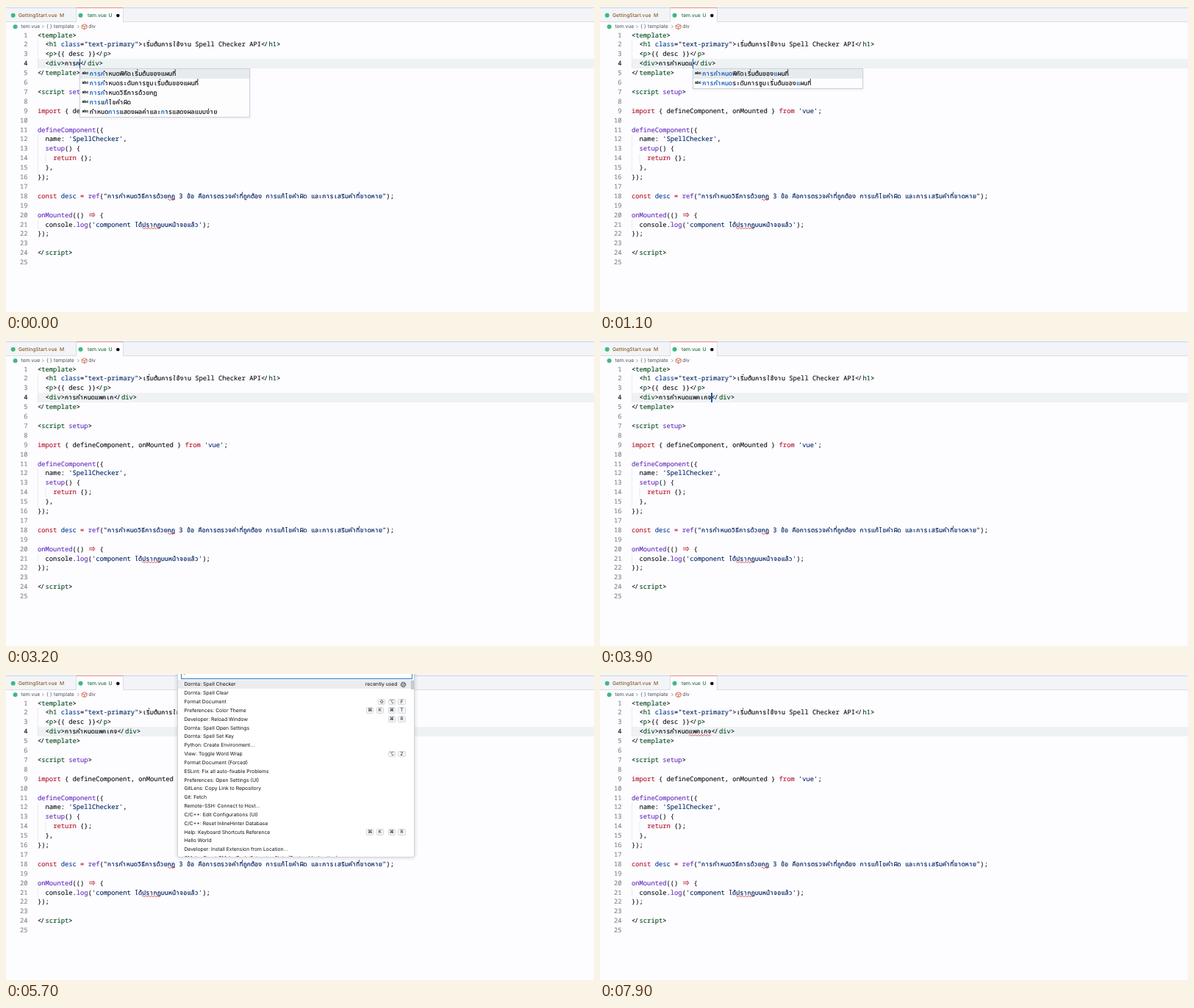
Recreate the animation shown at these times as an HTML page. Size 800 px wide and 417 px high, loop 8000 ms.

```html
<!DOCTYPE html>
<html lang="th">
<head>
<meta charset="utf-8">
<title>Editor with spell checking</title>
<style>
  html, body { margin: 0; width: 100%; height: 100%; overflow: hidden; }
  body { position: relative; background: #fdfcff; color: #0e1116; text-rendering: geometricPrecision;
    font: 6.8px/12px Inter, "Open Sans", sans-serif; }
  div, svg.over { position: absolute; white-space: pre; box-sizing: border-box; }
  svg.over { left: 0; top: 0; width: 800px; height: 417px; pointer-events: none; }
  .code { font: 8.8px/12.9px "Noto Sans Mono", "DejaVu Sans Mono", monospace; height: 12.9px;
    -webkit-text-stroke: .12px; }
  .num { left: 0; width: 29.5px; text-align: right; color: #7d858e; }
  .num.now { color: #0e1116; }
  .th { display: inline-block; width: 5.12px; line-height: 0; text-align: center; -webkit-text-stroke: .2px;
    font-family: "Noto Sans Thai Looped", Loma, "Noto Sans Thai", "Noto Sans", sans-serif; font-size: 8.4px; }
  .tight { position: relative; left: -1.2px; font-style: normal; }
  .k { color: #b3152a; } .f { color: #622cbc; } .s { color: #032563; }
  .g { color: #024c1a; } .b { color: #023b95; }
  .arrow { position: relative; }
  .arrow svg { position: absolute; left: 1px; top: 2.3px; width: 9px; height: 7px; }
  .hit { color: #0757ba; }
  #bar { left: 0; top: 0; width: 800px; height: 21.5px; background: #f3f4f8; border-bottom: .7px solid #d8dee4; }
  #edge { left: 0; top: 2px; width: 800px; height: .8px; background: #cfd5da; }
  #tab { left: 94.5px; top: 2px; width: 65.5px; height: 20px; background: #fdfcff;
    border: solid #d8dee4; border-width: 0 .7px; border-top: 1px solid #f08a80; }
  #row { left: 43px; top: 72.2px; width: 757px; height: 12.9px; background: #eff2f4; }
  #caret { top: 72.4px; width: 1.3px; height: 12.6px; background: #0759b5; }
  #pop { top: 85.3px; width: 232px; background: #fdfdfe; border: .7px solid #cdd2d8;
    box-shadow: 0 1px 3px rgba(60, 70, 80, .1); overflow: hidden; }
  #pop .code { left: 0; width: 232px; height: 13px; line-height: 13px; padding-left: 12.3px; }
  #pop .code:first-child { background: #e8ebee; }
  #pop .abc { position: absolute; left: 2px; font: 600 5.2px/12.5px Inter, sans-serif; letter-spacing: -.2px; }
  #list { left: 233px; top: -16.4px; width: 323px; height: 266.5px; background: #fff; border-radius: 0 0 3px 3px;
    border: .6px solid #d0d5da; box-shadow: 0 0 5px rgba(40, 50, 60, .24); overflow: hidden; }
  #list .ask { left: 3.5px; top: 4px; width: 315.5px; height: 18.3px; border: .9px solid #2a7fc4; }
  #list .cmd { left: 0; width: 322px; height: 11.83px; line-height: 11.83px; padding-left: 8.4px; }
  #list .cmd.on { background: #ebecee; }
  #list .bar { left: 316.5px; top: 24px; width: 4.5px; height: 12px; background: #c5c9cd; }
  .key { top: 1.6px; width: 10.4px; height: 8.8px; border: .6px solid #d5d8dc; border-radius: 1.5px;
    background: #f4f5f6; text-align: center; font: 6.2px/7.6px Inter, "DejaVu Sans", sans-serif; }
</style>
</head>
<body>
<div id="bar"></div><div id="edge"></div><div id="tab"></div><div id="row"></div>
<div id="page"></div>
<svg class="over" fill="none">
  <g id="guides" stroke="#e1e4e8" stroke-width=".7"></g>
  <g fill="#41b883"><circle cx="9.7" cy="12.8" r="3"/><circle cx="101.5" cy="12.8" r="3"/><circle cx="12.6" cy="28.2" r="3"/></g>
  <circle cx="152.3" cy="13" r="2.3" fill="#0e1116"/>
  <g stroke="#6e7781" stroke-width=".7"><path d="M49.3 26.3l1.9 1.9-1.9 1.9M97.3 26.3l1.9 1.9-1.9 1.9"/></g>
  <path stroke="#c4512d" stroke-width=".8" d="M103.2 26.6l3.6-1.8 3.3 1.6v3.4l-3.5 1.9-3.4-1.7zl3.4 1.6 3.5-1.8m-3.5 1.8v3.5"/>
  <g id="waves" stroke="#d1242f" stroke-width=".8"></g>
  <path id="newWave" stroke="#d1242f" stroke-width=".8"/>
</svg>
<div id="caret"></div>
<div id="pop"></div>
<div id="list"></div>
<script>
const LOOP = 8000, CELL = 5.28, THAI = 5.12, LEFT = 43, STEP = 12.9;
const $ = id => document.getElementById(id);
const esc = s => s.replace(/&/g, '&amp;').replace(/</g, '&lt;');
const lineTop = n => 33.5 + (n - 1) * STEP;

// One Thai cell: a base letter with the marks above and below it
const CELLS = /[\u0e00-\u0e7f][\u0e31\u0e34-\u0e3a\u0e47-\u0e4e]*/g;

const grid = s => esc(s)
  .replace(CELLS, c => `<span class="th">${c}</span>`)
  .replace(/&lt;\//g, '&lt;<i class="tight">/</i>');

const arrow = '<span class="arrow k">  <svg viewBox="0 0 9 7" fill="none" stroke="currentColor" ' +
  'stroke-width=".8"><path d="M0 2.4h7M0 4.8h7M5 .6l3.2 3L5 6.6"/></svg></span>';

// Pieces are split by "|"; a leading "x:" names the colour class
const paint = line => line.split('|').map(p => {
  const m = p.match(/^([a-z]):(.*)$/);
  if (p === '=>') return arrow;
  return m ? `<span class="${m[1]}">${grid(m[2])}</span>` : grid(p);
}).join('');

const lines = [
  '<|g:template|>',
  '  <|g:h1| |b:class|=|s:"text-primary"|>เริ่มต้นการใช้งาน Spell Checker API</|g:h1|>',
  '  <|g:p|>{{ desc }}</|g:p|>',
  '',
  '</|g:template|>',
  '',
  '<|g:script| |f:setup|>',
  '',
  'k:import| { defineComponent, onMounted } |k:from| |s:\'vue\'|;',
  '',
  'f:defineComponent|({',
  '  name: |s:\'SpellChecker\'|,',
  '  |f:setup|() {',
  '    |k:return| {};',
  '  },',
  '});',
  '',
  'k:const| |b:desc| |k:=| |f:ref|(|s:"การกำหนดวิธีการด้วยกฏ 3 ข้อ คือการตรวจคำที่ถูกต้อง การแก้ไขคำผิด และการเสริมคำที่ขาดหาย"|);',
  '',
  'f:onMounted|(() |=>| {',
  '  console.|f:log|(|s:\'component ได้ปรากฏบนหน้าจอแล้ว\'|);',
  '});',
  '',
  '</|g:script|>',
  ''
];

$('page').innerHTML = lines.map((text, i) => {
  const n = i + 1, top = `top:${lineTop(n)}px`;
  return `<div class="code num${n === 4 ? ' now' : ''}" style="${top}">${n}</div>` +
    `<div class="code" id="line${n}" style="${top};left:${LEFT}px">${paint(text)}</div>`;
}).join('');

const label = (x, y, text, color) =>
  `<div style="left:${x}px;top:${y - 6}px;color:${color}">${text}</div>`;
$('page').innerHTML += [
  [17, 13, 'GettingStart.vue', '#744500'], [73, 13, 'M', '#744500'],
  [111, 13, 'tem.vue', '#055d20'], [139.5, 13, 'U', '#055d20'],
  [20.5, 28.2, 'tem.vue', '#4b535d'], [55, 28.2, '{ }', '#4b535d'],
  [65, 28.2, 'template', '#4b535d'], [112.3, 28.2, 'div', '#4b535d']
].map(a => label(...a)).join('');

// Indent guides: column, first line, last line
$('guides').innerHTML = [[0, 2, 4], [0, 12, 15], [2, 14, 14], [0, 21, 21]].map(([c, a, b]) =>
  `<path d="M${LEFT + .4 + c * CELL} ${lineTop(a)}V${lineTop(b + 1)}"/>`).join('');

const wave = (x, n, w) => {
  let d = `M${x} ${lineTop(n) + 11.3}q1 -2 2 0`;
  for (let i = 2; i < w - 1; i += 2) d += 't2 0';
  return d;
};
$('waves').innerHTML = [[220, 18, 10.2], [185, 21, 24]]
  .map(a => `<path d="${wave(...a)}"/>`).join('');

// Command list
const commands = [
  'Dornta: Spell Checker', 'Dornta: Spell Clear', 'Format Document|⇧⌥F',
  'Preferences: Color Theme|⌘K ⌘T', 'Developer: Reload Window|⌘R',
  'Dornta: Spell Open Settings', 'Dornta: Spell Set Key', 'Python: Create Environment...',
  'View: Toggle Word Wrap|⌥Z', 'Format Document (Forced)', 'ESLint: Fix all auto-fixable Problems',
  'Preferences: Open Settings (UI)', 'GitLens: Copy Link to Repository', 'Git: Fetch',
  'Remote-SSH: Connect to Host...', 'C/C++: Edit Configurations (UI)',
  'C/C++: Reset InlineHinter Database', 'Help: Keyboard Shortcuts Reference|⌘K ⌘R',
  'Hello World', 'Developer: Install Extension from Location...',
  'CMake: Reset CMake Tools Extension State (For troubleshooting)'
];

const keys = (text = '') => {
  let x = 299.3, out = '';
  for (const c of [...text].reverse()) {
    if (c === ' ') { x -= 2.4; continue; }
    out += `<div class="key" style="left:${x}px">${c}</div>`;
    x -= 13.6;
  }
  return out;
};

const gear = '<svg style="position:absolute;left:302px;top:1.8px" width="9" height="9" viewBox="-4.5 -4.5 9 9" ' +
  'fill="none" stroke="#3b4249"><circle r="2.7" stroke-width=".9"/><circle r="1" stroke-width=".7"/>' +
  '<circle r="3.5" stroke-width=".9" stroke-dasharray="1.4 1.35"/></svg>';

$('list').innerHTML = '<div class="ask"></div><div style="left:7.5px;top:8.6px">&gt;</div>' +
  '<div id="askCaret" style="left:12.6px;top:11px;width:.8px;height:8.3px;background:#0e1116"></div>' +
  commands.map((c, i) => {
    const [name, combo] = c.split('|');
    const extra = i ? '' : `<div style="right:23.5px;top:0">recently used</div>${gear}`;
    return `<div class="cmd${i ? '' : ' on'}" style="top:${23.8 + i * 11.83}px">${name}${keys(combo)}${extra}</div>`;
  }).join('') + '<div class="bar"></div>';

// Suggestions
const phrases = [
  'การกำหนดพิกัดเริ่มต้นของแผนที่', 'การกำหนดระดับการซูมเริ่มต้นของแผนที่',
  'การกำหนดวิธีการด้วยกฏ', 'การแก้ไขคำผิด', 'กำหนดการแสดงผลค่าและการแสดงผลแบบง่าย'
];

const match = (phrase, typed) => {
  const hits = new Set();
  let at = phrase.indexOf(typed.slice(0, 3));
  if (at < 0) return null;
  for (const c of typed) {
    at = phrase.indexOf(c, at);
    if (at < 0) return null;
    hits.add(at++);
  }
  return hits;
};

const suggest = typed => phrases.map(p => {
  const hits = match(p, typed);
  return hits && '<div class="code"><span class="abc">abc</span>' + p.replace(CELLS, (c, at) =>
    `<span class="th${hits.has(at) ? ' hit' : ''}">${c}</span>`) + '</div>';
}).filter(Boolean);

// Timeline
const WORD = 'การกำหนดแพคเกจ', FIRST = 4;
const presses = [200, 400, 600, 800, 1000, 1700, 2000, 2300, 2600, 3600];
const OPEN = 4100, CLOSE = 6950, CHECKED = 7600;
const events = [0, ...presses, OPEN, CLOSE];
const show = (id, on) => { $(id).style.display = on ? '' : 'none'; };
const wordX = LEFT + 7 * CELL;
$('newWave').setAttribute('d', wave(wordX + 8 * THAI, 4, 30.6));

let shown = '';
function type(typed) {
  if (typed === shown) return;
  shown = typed;
  const x = wordX + typed.length * THAI, rows = suggest(typed);
  $('line4').innerHTML = paint(`  <|g:div|>${typed}</|g:div|>`);
  $('caret').style.left = x - .4 + 'px';
  $('pop').style.left = x + 'px';
  $('pop').style.height = rows.length * 13 + 1.4 + 'px';
  $('pop').innerHTML = rows.map((r, i) =>
    r.replace('"code"', `"code" style="top:${i * 13}px"`)).join('');
  show('pop', rows.length);
}

const start = performance.now();
function draw() {
  const t = (performance.now() - start) % LOOP;
  const last = events.filter(e => e <= t).pop();
  const blink = Math.floor((t - last) / 500) % 2 === 0;
  const asking = t >= OPEN && t < CLOSE;
  type(WORD.slice(0, FIRST + presses.filter(p => p <= t).length));
  show('list', asking);
  show('askCaret', blink);
  show('caret', blink && !asking);
  show('waves', t < CLOSE || t >= CHECKED);
  show('newWave', t >= CHECKED);
  requestAnimationFrame(draw);
}
draw();
</script>
</body>
</html>
```
